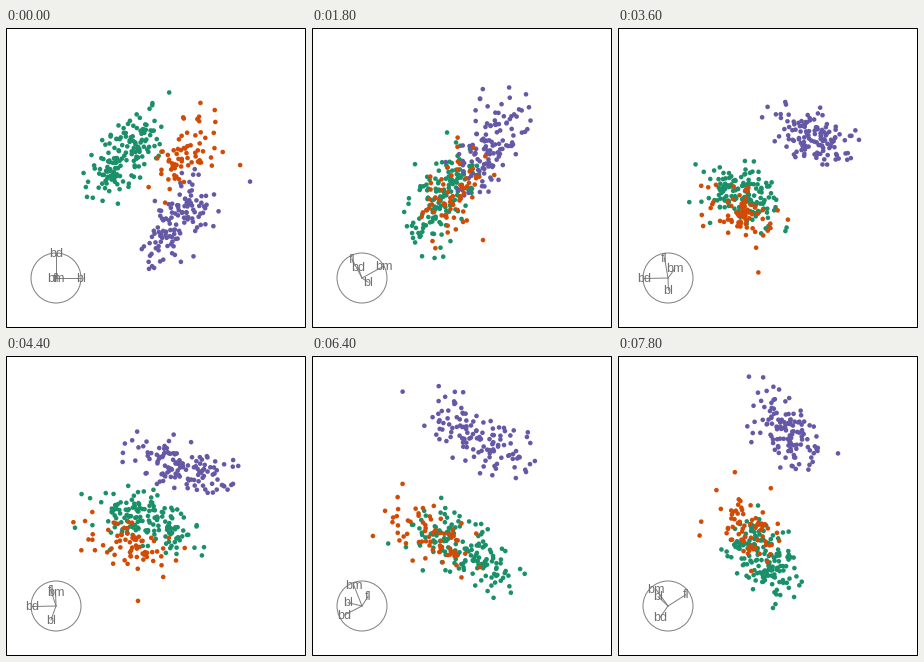
Write a matplotlib script that moves like this. It is 300x300 px and loops after 8000 ms.

```python
import numpy as np
import matplotlib.pyplot as plt
from matplotlib.animation import FuncAnimation
from matplotlib.patches import Circle, Rectangle

SIZE, DPI = 300, 100
FRAMES, STEP = 40, 200
PX = 72 / DPI                      # points per pixel
SCALE = 165                        # pixels per data unit
MID = np.array([150, 150.3])
HUB, RADIUS = np.array([50, 250]), 25
LABELS = ["bl", "bd", "fl", "bm"]

# every group is two blobs, GAP either side of its mean
GAP = np.array([0.065, 0.09, 0.06, 0.09])
SPREAD = np.array([0.08, 0.098, 0.092, 0.085])

# count, colour, mean, one far point
GROUPS = [
    (151, "#1a9068", (-0.19, 0.14, -0.18, -0.14), (0.08, 0.52, -0.12, 0.0)),
    (123, "#6558a6", (0.13, -0.26, 0.28, 0.24), (0.57, -0.02, 0.49, 0.51)),
    (68, "#d24a04", (0.18, 0.15, -0.09, -0.13), (0.51, 0.08, -0.34, -0.14)),
]

# key poses: time in s, then the x and y parts of the axes in label order
POSES = [
    (0.0, (1, 0, 0, 0), (0, 1, 0, 0)),
    (1.8, (0.24, -0.16, -0.40, 0.84), (-0.16, 0.40, 0.72, 0.44)),
    (2.8, (0.16, -0.76, -0.14, 0.60), (-0.36, 0.04, 0.84, 0.32)),
    (4.4, (-0.20, -0.96, -0.20, -0.02), (-0.56, -0.02, 0.62, 0.56)),
    (5.4, (-0.50, -0.78, -0.32, -0.16), (-0.44, 0.00, 0.08, 0.88)),
    (6.4, (-0.56, -0.72, 0.24, -0.32), (0.12, -0.36, 0.36, 0.80)),
    (7.8, (-0.40, -0.32, 0.72, -0.48), (0.36, -0.44, 0.44, 0.64)),
]


def orthonormal(basis):
    u, _, v = np.linalg.svd(basis, full_matrices=False)
    return u @ v


def make_group(rng, count, mean, far):
    n = count - 1
    noise = rng.normal(size=(n, 4)) + 0.5 * rng.normal(size=(n, 1))
    noise = np.clip((noise - noise.mean(0)) / noise.std(0), -2.3, 2.3)
    side = np.where(np.arange(n) % 2, 1, -1)[:, None]
    return np.vstack([mean + side * GAP + noise * SPREAD, far])


times = np.array([p[0] for p in POSES])
bases = np.array([orthonormal(np.array(p[1:]).T) for p in POSES])
# halfway plane of the long first turn
times = np.insert(times, 1, times[1] / 2)
bases = np.insert(bases, 1, orthonormal(bases[0] + bases[1]), axis=0)
slopes = np.gradient(bases, times, axis=0, edge_order=2)


def basis_at(t):
    """Smooth path through the key poses, kept a rigid projection."""
    i = min(np.searchsorted(times, t, side="right") - 1, len(times) - 2)
    h = times[i + 1] - times[i]
    s = (t - times[i]) / h
    curve = ((1 + 2 * s) * (1 - s) ** 2 * bases[i]
             + s * (1 - s) ** 2 * h * slopes[i]
             + s * s * (3 - 2 * s) * bases[i + 1]
             + s * s * (s - 1) * h * slopes[i + 1])
    return orthonormal(curve)


rng = np.random.default_rng(7)
data = np.vstack([make_group(rng, n, mean, far) for n, _, mean, far in GROUPS])
colors = np.repeat([g[1] for g in GROUPS], [g[0] for g in GROUPS])

fig = plt.figure(figsize=(SIZE / DPI, SIZE / DPI), dpi=DPI, facecolor="white")
ax = fig.add_axes([0, 0, 1, 1])
ax.set(xlim=(0, SIZE), ylim=(SIZE, 0))
ax.axis("off")
ax.add_patch(Rectangle((0.5, 0.5), SIZE - 1, SIZE - 1, fill=False,
                       ec="black", lw=PX, snap=False))
ax.add_patch(Circle(HUB, RADIUS, fill=False, ec="#808080", lw=PX))

spokes = [ax.plot([], [], color="#808080", lw=PX)[0] for _ in LABELS]
names = [ax.text(*HUB, s, color="#727272", fontsize=12.6 * PX, ha="center",
                 va="center", family="Liberation Sans") for s in LABELS]
dots = ax.scatter(np.zeros(len(data)), np.zeros(len(data)),
                  s=(4.6 * PX) ** 2, c=colors, linewidths=0, zorder=3)


def update(frame):
    basis = basis_at(frame * STEP / 1000) * [1, -1]
    dots.set_offsets(MID + SCALE * data @ basis)
    for spoke, name, tip in zip(spokes, names, HUB + RADIUS * basis):
        spoke.set_data(*zip(HUB, tip))
        name.set_position(tip + [0, 0.6])
    return [dots, *spokes, *names]


anim = FuncAnimation(fig, update, frames=FRAMES, interval=STEP,
                     repeat=True, repeat_delay=0, blit=False)
plt.show()
```
